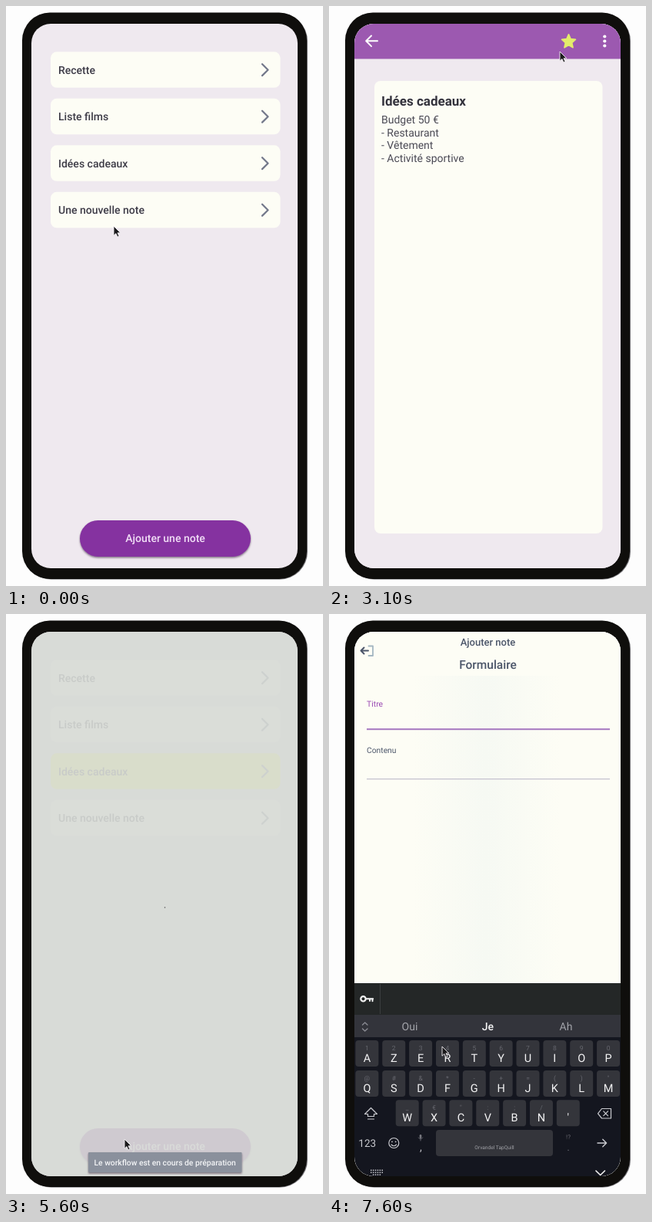
Recreate the animation shown at these times as an HTML page. Size 412 by 751 pixels, loop 8000 ms.

```html
<!DOCTYPE html>
<html lang="fr">
<head>
<meta charset="utf-8">
<title>Notes</title>
<style>
html, body { margin: 0; width: 100%; height: 100%; overflow: hidden; background: #fdfdfd; }
svg { display: block; width: 100vw; height: 100vh; }
text { font-family: Roboto, sans-serif; text-rendering: geometricPrecision; white-space: pre; }
.line { fill: none; stroke-linecap: round; stroke-linejoin: round; }
</style>
</head>
<body>
<svg id="stage" viewBox="0 0 412 751"></svg>
<script>
const stage = document.getElementById('stage');

const text = (x, y, s, size, fill, weight = 400, anchor = 'start', extra = '') =>
  `<text x="${x}" y="${y}" font-size="${size}" fill="${fill}" font-weight="${weight}" text-anchor="${anchor}" ${extra}>${s}</text>`;
const mid = (x, y, s, size, fill, weight) => text(x, y, s, size, fill, weight, 'middle');
const box = (x, y, w, h, fill, r = 0, extra = '') =>
  `<rect x="${x}" y="${y}" width="${w}" height="${h}" rx="${r}" fill="${fill}" ${extra}/>`;
const line = (d, color, width = 1.2) =>
  `<path class="line" d="${d}" stroke="${color}" stroke-width="${width}"/>`;
const dot = (x, y, r, fill) => `<circle cx="${x}" cy="${y}" r="${r}" fill="${fill}"/>`;
const group = (id, body) => `<g id="${id}">${body}</g>`;

const PAPER = '#fdfdf5', LILAC = '#efe9ef', INK = '#3d3b47', SLATE = '#4c566a';

function listPage() {
  const cards = ['Recette', 'Liste films', 'Idées cadeaux', 'Une nouvelle note'].map((s, i) => {
    const y = 59.3 + i * 60.5;
    return box(58, y, 298.5, 46.5, PAPER, 8, `id="card${i}"`) +
      text(68, y + 28.3, s, 14, INK, 500) +
      line(`M333 ${y + 16}l7.5 7.4l-7.5 7.4`, '#74798b', 2.3);
  }).join('');
  return box(33, 23, 346, 705, LILAC) + cards +
    box(96, 666, 222, 47, '#8531a0', 23.5, 'id="add" filter="url(#shadow)"') +
    mid(207, 694, 'Ajouter une note', 14, '#f1def6', 500);
}

function starPath(cx, cy, R, r) {
  const pts = Array.from({ length: 10 }, (_, i) => {
    const a = i * Math.PI / 5 - Math.PI / 2, d = i % 2 ? r : R;
    return `${(cx + d * Math.cos(a)).toFixed(2)} ${(cy + d * Math.sin(a)).toFixed(2)}`;
  });
  return `M${pts.join('L')}Z`;
}

function notePage() {
  const lines = ['Budget 50 €', '- Restaurant', '- Vêtement', '- Activité sportive'];
  return box(33, 23, 346, 705, LILAC) + box(33, 23, 346, 45.5, '#9c59b0') +
    line('M63 45.3H48.5M55 38.5L48.2 45.3L55 52.1', '#fff', 2) +
    `<path id="star" d="${starPath(311.5, 46.2, 9.3, 4.3)}" stroke-width="1.8" stroke-linejoin="round"/>` +
    [39.5, 45.5, 51.5].map(y => dot(358.3, y, 2.1, '#fff')).join('') +
    box(59, 97, 296.5, 586, PAPER, 8) +
    text(68, 128.5, 'Idées cadeaux', 17, '#34333d', 700) +
    lines.map((s, i) => text(68, 152 + i * 16.5, s, 14, '#4b4a55')).join('');
}

function formPage() {
  return box(33, 23, 346, 705, PAPER) + box(108, 80, 192, 400, 'url(#tint)') +
    line('M51 47.5H41.5M45.5 43.5L41.5 47.5L45.5 51.5', SLATE, 2) +
    line('M51.5 41.5H57V54H51.5', '#a5b7c2', 1.8) +
    mid(206.5, 41, 'Ajouter note', 13, SLATE, 500) +
    mid(206.5, 71.3, 'Formulaire', 15.5, SLATE, 500) +
    text(49, 120, 'Titre', 10.4, '#9a49b3') +
    box(49, 148.2, 316, 2, '#a678c0') +
    text(49, 179.5, 'Contenu', 10.3, SLATE) +
    box(49, 213, 316, 1.3, '#c6c3d0') +
    box(49.2, 128, 1.2, 16, '#55535f', 0, 'id="caret"');
}

function keyRow(letters, hints, x0, y) {
  return [...letters].map((c, i) => {
    const x = x0 + i * 34.85;
    return box(x - 15, y, 30, 34, '#34353b', 4) +
      mid(x, y + 12.5, hints[i] || '', 8.5, '#66676e') +
      mid(x, y + 27.6, c, 14.5, '#f4f4f5');
  }).join('');
}

function keyboard() {
  const pale = '#c9cacf';
  return box(33, 478, 346, 41, '#242727', 0, 'id="strip"') +
    box(66, 479, 1, 39, '#3b3e3f', 0, 'id="divider"') +
    `<circle cx="44.5" cy="498.3" r="3.2" fill="none" stroke="#f2f2f2" stroke-width="2.2"/>` +
    line('M48.5 498.3H57.2M53 498.3V501M56.5 498.3V501.2', '#f2f2f2', 2) +
    box(33, 519, 346, 29.5, '#33343b') + box(33, 548, 346, 180, '#14161f') +
    line('M43.5 532L46.7 529L50 532M43.5 537L46.7 540L50 537', '#8b8c94', 1.3) +
    mid(105, 539.3, 'Oui', 14, '#a3a4aa') + mid(206.5, 539.3, 'Je', 14, '#f4f4f5', 500) + mid(308, 539.3, 'Ah', 14, '#a3a4aa') +
    keyRow('AZERTYUIOP', '1234567890', 49.4, 552) +
    keyRow('QSDFGHJKLM', '@#&*-+=()"', 49.4, 591) +
    keyRow("WXCVBN'", '_€":;/', 101.7, 629.3) +
    line('M54.5 639.5L46.5 647.5H50.5V650.5H58.5V647.5H62.5ZM50.5 654H58.5', pale) +
    line('M354.5 640.5H366.5V653H354.5L349.5 646.8ZM356.8 643.8L362.5 649.7M362.5 643.8L356.8 649.7', pale) +
    mid(49.7, 690, '123', 13.5, pale) +
    `<circle cx="84.3" cy="685" r="6.5" fill="none" stroke="${pale}" stroke-width="1.2"/>` +
    dot(82, 683.3, .9, pale) + dot(86.6, 683.3, .9, pale) + line('M81 687Q84.3 690.5 87.6 687', pale, 1.1) +
    box(117.7, 674, 2.6, 5, '#77787f', 1.3) + line('M116.3 678Q119 682 121.7 678M119 680.5V682', '#77787f', .8) +
    mid(119.5, 695, ',', 14, pale) +
    box(139, 668, 152, 34, '#34353b', 4) +
    mid(215, 693, 'Orvandel TapQuill', 6.6, '#a0a1a7') +
    mid(311, 680, '!?', 8, '#66676e') + mid(311, 695, '.', 14, '#66676e') +
    line('M349 685H360.5M355.8 680.2L360.6 685L355.8 689.8', pale, 1.4) +
    [0, 1, 2].map(r => Array.from({ length: r < 2 ? 6 : 4 }, (_, i) =>
      box(54 + i * 2.9 + (r === 2 ? 2.9 : 0), 719.5 + r * 2.9, 1.5, 1.5, pale)).join('')).join('') +
    line('M347 721L352.7 726.5L358.4 721', '#eee', 1.7);
}

const toast = box(107, 697, 199.5, 26, '#8a909c', 1, 'filter="url(#shadow)"') +
  mid(206.7, 713.5, 'Le workflow est en cours de préparation', 10.3, '#f3f4f6', 500);

stage.innerHTML = `
<defs>
  <clipPath id="screen">${box(33, 23, 346, 705, '#fff', 25)}</clipPath>
  <filter id="shadow" x="-10%" y="-20%" width="120%" height="150%">
    <feDropShadow dx="0" dy="1.5" stdDeviation="1.3" flood-color="#302038" flood-opacity=".6"/>
  </filter>
  <linearGradient id="tint">
    <stop offset="0" stop-color="#f6f9f3" stop-opacity="0"/>
    <stop offset=".5" stop-color="#f6f9f3"/>
    <stop offset="1" stop-color="#f6f9f3" stop-opacity="0"/>
  </linearGradient>
</defs>
${box(23, 9.5, 369, 733, '#77767a', 36)}
${box(21, 8.5, 370, 733.5, '#0f0e0c', 36)}
<g clip-path="url(#screen)">
  ${group('list', listPage())}
  ${group('note', notePage())}
  ${group('veil', box(33, 23, 346, 705, '#d7dad6'))}
  ${group('form', formPage())}
  ${group('keys', keyboard())}
  ${group('spot', dot(206.5, 380, .8, '#555'))}
  ${group('toast', toast)}
</g>
<path id="cursor" d="M0 0V12.2L2.9 9.6L4.9 14L7 13.1L5 8.8H8.8Z" fill="#1b1a1c" stroke="#f4f1f4" stroke-width=".9" stroke-linejoin="round"/>`;

const el = id => document.getElementById(id);
const clamp = v => Math.max(0, Math.min(1, v));
const ramp = (t, a, b) => clamp((t - a) / (b - a));
const easeOut = p => 1 - (1 - p) ** 3;
const within = (t, a, b) => t >= a && t < b;
const fade = (id, v) => el(id).setAttribute('opacity', v);
const shift = (id, x, y) => el(id).setAttribute('transform', `translate(${x} ${y})`);
const fill = (id, c) => el(id).setAttribute('fill', c);

// pointer path: time, x, y
const path = [
  [0, 140, 285], [100, 140, 285], [150, 147, 233], [250, 147, 233], [300, 149, 209],
  [1300, 149, 209], [1700, 178, 150], [1800, 178, 150], [2050, 216, 107], [2300, 271, 56],
  [2450, 271, 56], [2900, 311, 47], [3050, 311, 47], [3100, 300, 59], [3200, 300, 59],
  [3350, 150, 57], [3450, 150, 57], [3500, 85, 54], [3650, 85, 54], [3700, 69, 49],
  [3800, 69, 49], [4050, 60, 46], [4550, 60, 46], [5100, 154, 680], [5650, 154, 680],
  [6300, 160, 632], [6350, 161, 610], [6500, 161, 610], [6650, 159, 601], [6750, 159, 601],
  [6950, 147, 560], [8000, 147, 560]
];

function pointer(t) {
  const i = Math.max(1, path.findIndex(p => p[0] > t));
  const [a, b] = [path[i - 1], path[i]], p = ramp(t, a[0], b[0]);
  return [a[1] + (b[1] - a[1]) * p, a[2] + (b[2] - a[2]) * p];
}

function draw(t) {
  const open = easeOut(ramp(t, 650, 1000)), close = ramp(t, 4200, 4350);
  fade('note', open * (1 - close));
  shift('note', 0, 40 * (1 - open) + 40 * close);

  const starred = t >= 2700;
  el('star').setAttribute('fill', starred ? '#e3ec6b' : '#fff');
  el('star').setAttribute('stroke', starred ? '#e3ec6b' : '#fff');
  fill('card2', starred ? '#f3fb65' : PAPER);
  fill('add', within(t, 5400, 5600) ? '#9148a9' : '#8531a0');

  fade('veil', t < 5600 ? 0 : t < 5700 ? .91 : 1);
  fade('spot', +within(t, 5600, 5850));
  fade('toast', +within(t, 5600, 5900));
  fade('form', ramp(t, 5750, 5950));
  shift('keys', 0, 250 * (1 - easeOut(ramp(t, 6000, 6250))));
  fade('keys', +(t > 6000));
  fill('strip', t < 6350 ? '#cfcfcd' : '#242727');
  fade('divider', +(t >= 6350));
  fade('caret', +(within(t, 6200, 6550) || within(t, 6950, 7600)));
  shift('cursor', ...pointer(t));
}

const start = performance.now();
function tick() {
  const t = (performance.now() - start) % 8000;
  draw(Math.floor(t / 50) * 50);
  requestAnimationFrame(tick);
}
tick();
</script>
</body>
</html>
```
